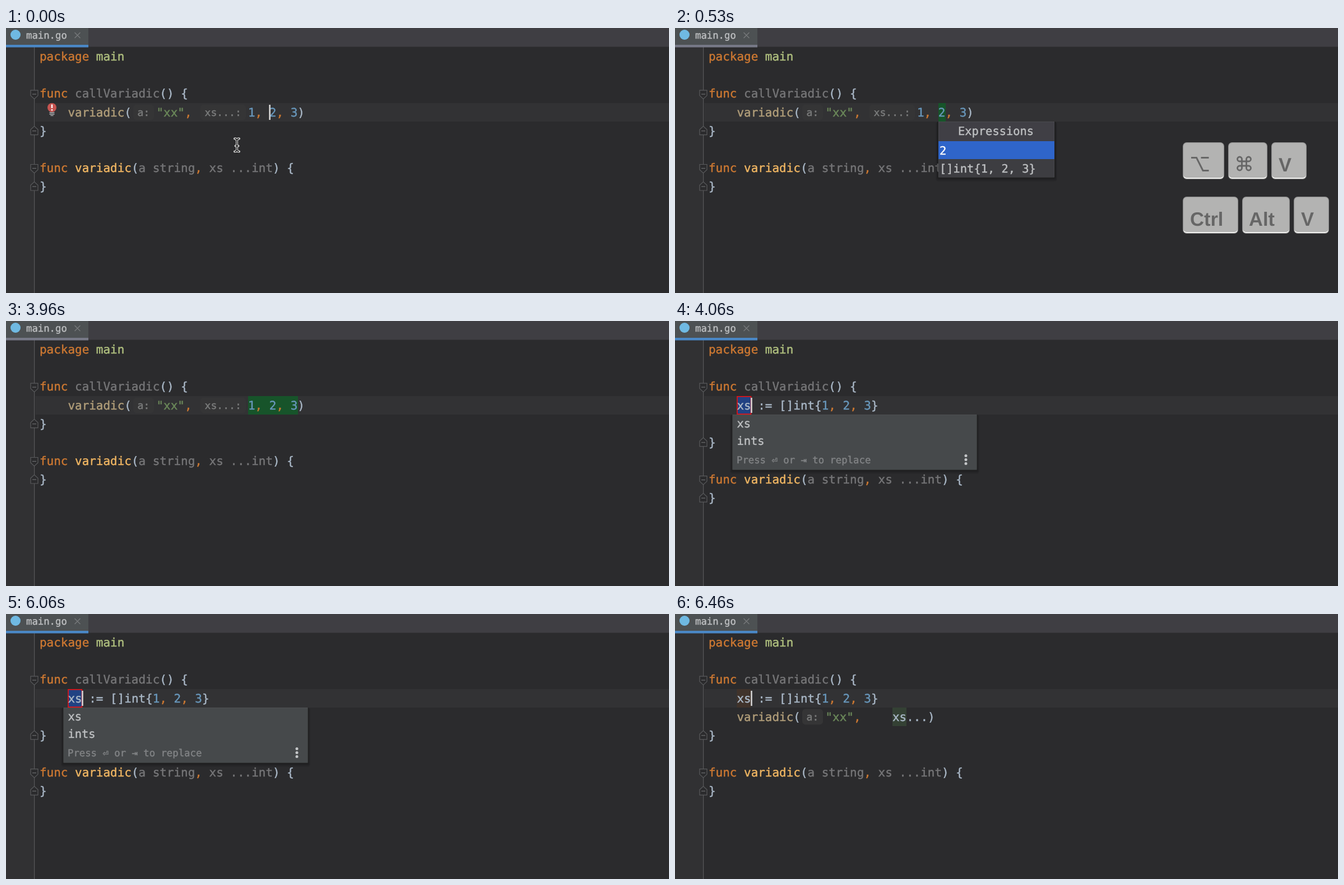
Recreate the animation shown at these times as an HTML page. Size 1183 by 473 pixels, loop 6500 ms.

```html
<!DOCTYPE html>
<html lang="en">
<head>
<meta charset="utf-8">
<title>Extract variable</title>
<style>
html, body { margin: 0; width: 100%; height: 100%; overflow: hidden; background: #2b2b2d; }
svg { display: block; width: 1183px; height: 473px; }
text { white-space: pre; text-rendering: geometricPrecision; font-family: "DejaVu Sans Mono", monospace; }
text, tspan { fill: currentColor; stroke: currentColor; stroke-width: .45px; }
.key { font: bold 34.5px "Liberation Sans", Arial, sans-serif; color: #666; stroke: none; }
</style>
</head>
<body>
<svg id="stage" viewBox="0 0 1183 473"></svg>
<script>
const LOOP = 6500, CHAR = 12.61, CODE_SIZE = 20.945, POPUP_SIZE = 20.4, SMALL_SIZE = 17.3;
const C = {
  text: '#a9b7c6', keyword: '#cc7832', pkg: '#afbf7e', dim: '#757577', call: '#b09d79',
  decl: '#efb562', string: '#6a8759', number: '#6897bb', hint: '#7b7c7c', popup: '#bdbfc1'
};
const stage = document.getElementById('stage');

function add(parent, tag, attrs = {}, content) {
  const el = document.createElementNS('http://www.w3.org/2000/svg', tag);
  for (const name in attrs) el.setAttribute(name, attrs[name]);
  if (content !== undefined) el.textContent = content;
  return parent.appendChild(el);
}
const group = (parent = stage) => add(parent, 'g');
const rect = (parent, x, y, x2, y2, fill, more = {}) =>
  add(parent, 'rect', { x, y, width: x2 - x, height: y2 - y, fill, ...more });
const stroke = (parent, d, color, width, more = {}) =>
  add(parent, 'path', { d, fill: 'none', stroke: color, 'stroke-width': width, ...more });
const label = (parent, x, y, str, color, size) =>
  add(parent, 'text', { x, y, color, 'font-size': size }, str);

const baseline = row => 58.2 + 33.1 * row;
const column = n => 60 + CHAR * n;

// Runs alternate between a string and its colour.
function code(parent, x, row, ...runs) {
  const line = add(parent, 'text', { x, y: baseline(row), 'font-size': CODE_SIZE });
  for (let i = 0; i < runs.length; i += 2) add(line, 'tspan', { color: C[runs[i + 1]] }, runs[i]);
}

function hint(parent, x, x2, row, str) {
  const y = baseline(row);
  rect(parent, x, y - 21, x2, y + 7, '#353536', { rx: 6 });
  label(parent, x + 7.5, y - 1, str, C.hint, 18.1);
}

function fold(parent, row, closing) {
  const dir = closing ? -1 : 1, mid = baseline(row) - (closing ? 6.9 : 6.3);
  add(parent, 'path', {
    d: `M44 ${mid - 7 * dir}H57V${mid + 2.5 * dir}L50.5 ${mid + 8.5 * dir}L44 ${mid + 2.5 * dir}Z`,
    fill: '#2b2b2d', stroke: '#5a5b5d', 'stroke-width': 1.2
  });
  stroke(parent, `M47 ${mid}h7`, '#6c6d6f', 1.2);
}

const numbers = ['1', 'number', ', ', 'keyword', '2', 'number', ', ', 'keyword', '3', 'number'];

function declaration(parent, braceRow) {
  fold(parent, braceRow, true);
  code(parent, 60, braceRow, '}', 'text');
  fold(parent, braceRow + 2, false);
  code(parent, 60, braceRow + 2, 'func ', 'keyword', 'variadic', 'decl', '(', 'text', 'a string', 'dim',
    ',', 'keyword', ' xs ...int', 'dim', ') {', 'text');
  fold(parent, braceRow + 3, true);
  code(parent, 60, braceRow + 3, '}', 'text');
}

function callStart(parent, row) {
  code(parent, column(4), row, 'variadic', 'call', '(', 'text');
  hint(parent, 227, 264, row, 'a:');
  code(parent, 268.5, row, '"xx"', 'string', ',', 'keyword');
}

function shadow(parent, x, y, x2, y2) {
  for (let i = 1; i < 6; i++)
    rect(parent, x - i, y, x2 + i, y2 + 1.6 * i, '#000', { opacity: .07, rx: i });
}

function keycap(parent, x, x2, y, str, textX) {
  rect(parent, x, y, x2, y + 66, '#858585', { rx: 7 });
  rect(parent, x + 1, y + 4, x2 - 1, y + 65, '#f0f0ee', { rx: 6 });
  rect(parent, x + 1, y + 1, x2 - 1, y + 62.5, '#b3b3b2', { rx: 6, stroke: '#a0a09f', 'stroke-width': .8 });
  if (str) add(parent, 'text', { class: 'key', x: textX, y: y + 52 }, str);
}

// Window frame and fixed lines
rect(stage, 0, 0, 1183, 473, '#2b2b2d');
rect(stage, 0, 34, 50, 473, '#313133');
rect(stage, 50, 34, 51.2, 473, '#59595b');
rect(stage, 0, 0, 1183, 33, '#3f3e43');
rect(stage, 0, 33, 1183, 34, '#353537');
rect(stage, 0, 0, 147, 34, '#4d5153');
const underline = rect(stage, 0, 30, 147, 34.5, '#4a88c7');
add(stage, 'circle', { cx: 17, cy: 12, r: 9, fill: '#6fb9e2' });
label(stage, 36, 19, 'main.go', '#bbbdbf', SMALL_SIZE);
stroke(stage, 'M122.5 8l10 10m0-10l-10 10', '#77797b', 1.4);
rect(stage, 51, 134, 1183, 167, '#323234');
code(stage, 60, 0, 'package ', 'keyword', 'main', 'pkg');
fold(stage, 2, false);
code(stage, 60, 2, 'func ', 'keyword', 'callVariadic', 'dim', '() {', 'text');

// Code before extraction
const before = group();
const markTwo = rect(before, 470, 134, 483, 167, '#17542a');
const markAll = rect(before, 432, 134, 521, 167, '#17542a');
callStart(before, 3);
hint(before, 347, 428, 3, 'xs...:');
code(before, 432, 3, ...numbers, ')', 'text');
declaration(before, 4);

const idle = group(before);
add(idle, 'circle', { cx: 82, cy: 142, r: 8, fill: '#c75450' });
stroke(idle, 'M82 136.5v6.5m0 2v2.4', '#fff', 2.4);
stroke(idle, 'M77.5 151h9m-9 2.7h9m-7 2.7h5', '#b9bbbd', 1.4);
const beam = 'M408 197.5q4 0 4 3.5q0-3.5 4-3.5M412 201v16M408 220.5q4 0 4-3.5q0 3.5 4 3.5M409.5 210.5h5';
stroke(idle, beam, '#dedede', 3.8, { 'stroke-linecap': 'round' });
stroke(idle, beam, '#161616', 1.5);
const firstCaret = rect(before, 469.3, 137, 472, 164, '#d4d4d4');

// Expression chooser
const chooser = group();
shadow(chooser, 470, 167, 677, 266);
rect(chooser, 470, 167, 677, 266.5, '#55565a');
rect(chooser, 470.5, 167.5, 676.5, 202, '#403f45');
rect(chooser, 470.5, 202, 676.5, 266, '#3d3d41');
label(chooser, 505, 191, 'Expressions', C.popup, POPUP_SIZE);
const choices = ['2', '[]int{1, 2, 3}'].map((str, i) => {
  const top = 202 + 32 * i;
  return {
    bar: rect(chooser, 470, top, 677, top + 32, '#2f65ca'),
    text: label(chooser, 472, 225.5 + 32 * i, str, C.popup, POPUP_SIZE)
  };
});

// Shortcut keys
const keys = group();
keycap(keys, 906, 980, 204);
stroke(keys, 'M921 231.5h9.5l11.5 23h10.5M938.5 231.5h14', '#666', 3);
keycap(keys, 987, 1057, 204);
stroke(keys, 'M-4-8V8A4 4 0 1 1-8 4H8A4 4 0 1 1 4 8V-8A4 4 0 1 1 8-4H-8A4 4 0 1 1-4-8Z', '#666', 2.8,
  { transform: 'translate(1015.5 242)' });
keycap(keys, 1064, 1127, 204, 'V', 1077);
keycap(keys, 906, 1005, 301, 'Ctrl', 919);
keycap(keys, 1012, 1097, 301, 'Alt', 1024);
keycap(keys, 1104, 1167, 301, 'V', 1117);

// Code after extraction
const after = group();
const template = rect(after, 111, 134.8, 135.5, 166.2, '#214283', { stroke: '#f01010', 'stroke-width': 1.6 });
const usages = group(after);
rect(usages, 110.3, 134, 135.5, 167, '#40332b');
rect(usages, 388, 167, 413, 200, '#344134');
code(after, column(4), 3, 'xs := []int{', 'text', ...numbers, '}', 'text');
callStart(after, 4);
const spreadHint = group(after);
hint(spreadHint, 347, 428, 4, 'xs...:');
code(spreadHint, 432, 4, 'xs...)', 'text');
const spread = group(after);
code(spread, 388, 4, 'xs...)', 'text');
declaration(after, 5);

// Name suggestions
const names = group(after);
shadow(names, 103, 167, 538, 265);
rect(names, 102.5, 167, 538.5, 265.5, '#55585a');
rect(names, 103, 167.5, 538, 265, '#46494b');
label(names, 110.5, 189.5, 'xs', C.popup, POPUP_SIZE);
label(names, 110.5, 221, 'ints', C.popup, POPUP_SIZE);
label(names, 110, 254, 'Press ⏎ or ⇥ to replace', '#818385', SMALL_SIZE);
for (const cy of [240.5, 247.5, 254.5]) add(names, 'circle', { cx: 519, cy, r: 2.5, fill: '#c4c6c8' });
const secondCaret = rect(after, 135.2, 137, 137.8, 164, '#d4d4d4');

const show = (el, on) => el.setAttribute('display', on ? 'inline' : 'none');

function render(t) {
  const within = (from, to) => t >= from && t < to;
  const extracted = t >= 4060;
  const second = t >= 3200;

  show(before, !extracted);
  show(idle, t < 430);
  show(firstCaret, t < 260);
  show(markTwo, within(430, 3200));
  show(markAll, second);
  underline.setAttribute('fill', within(430, 4060) ? '#777987' : '#4a88c7');

  show(chooser, within(430, 3960));
  choices.forEach(({ bar, text }, i) => {
    const selected = second === (i === 1);
    show(bar, selected);
    text.setAttribute('color', selected ? '#fff' : C.popup);
  });
  show(keys, within(480, 3960));
  keys.setAttribute('opacity', t < 530 ? .5 : 1);

  show(after, extracted);
  show(template, t < 6200);
  show(names, t < 6160);
  show(usages, t >= 6460);
  show(spread, t >= 6460);
  show(spreadHint, t < 6460);
  show(secondCaret, t >= 6060 || Math.floor((t - 4060) / 500) % 2 === 0);
}

function tick(now) {
  render(now % LOOP);
  requestAnimationFrame(tick);
}
render(0);
requestAnimationFrame(tick);
</script>
</body>
</html>
```
